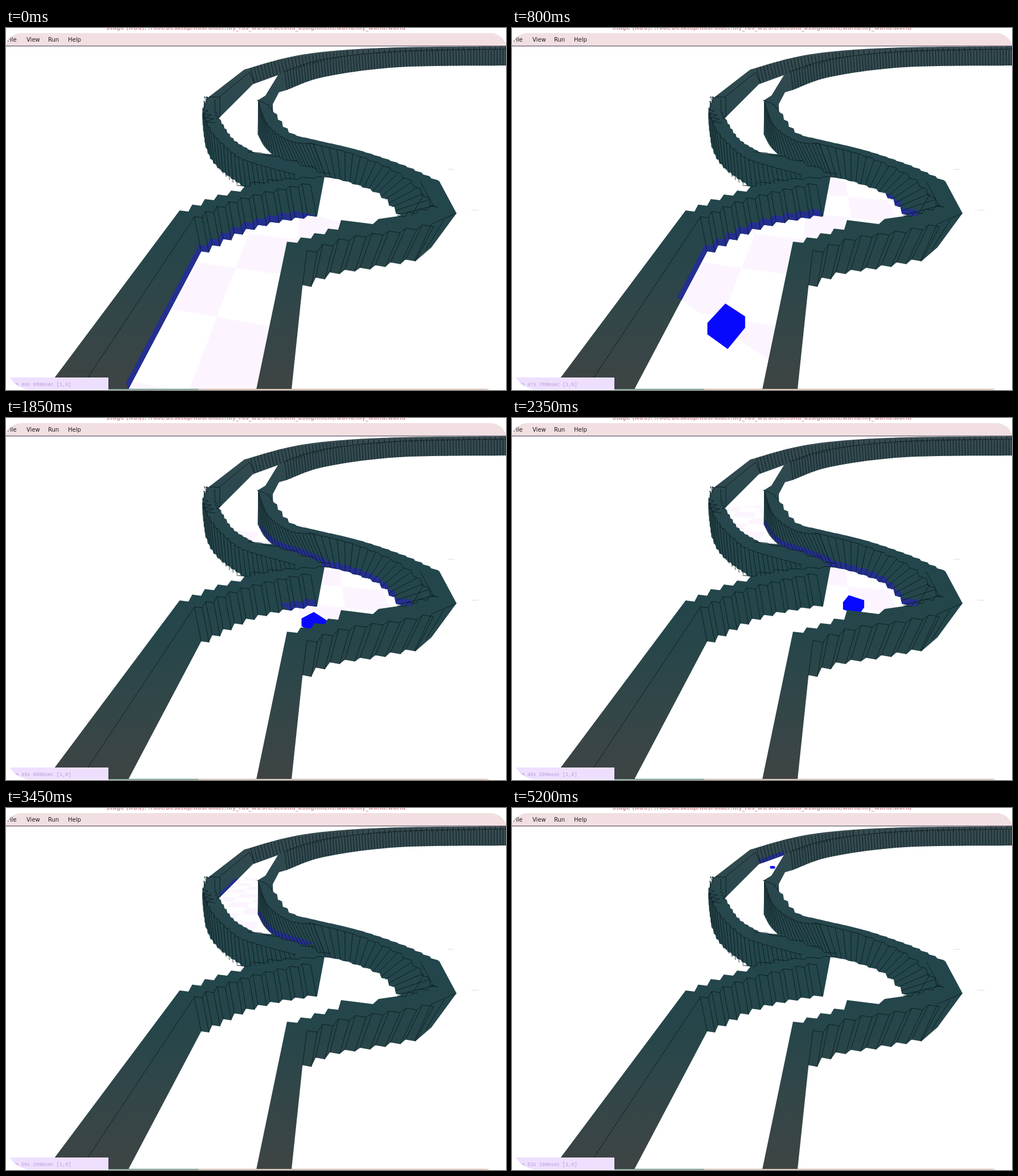
An HTML page with a canvas for the animation above (5.25 s loop, 879 by 637 pixels).

```html
<!DOCTYPE html>
<html lang="en">
<head>
<meta charset="utf-8">
<title>Track simulation</title>
<style>
html, body { margin: 0; width: 100%; height: 100%; overflow: hidden; background: #fff; }
canvas { display: block; }
</style>
</head>
<body>
<canvas id="stage" width="879" height="637"></canvas>
<script>
const ctx = document.getElementById('stage').getContext('2d');
const W = 879, H = 637, LOOP = 5250, STEP = 50;

// ---------- curves ----------
// smooth dense line through a few x, y pairs
function curve(...v) {
  const n = v.length / 2, out = [];
  const at = (i, c) => v[2 * Math.max(0, Math.min(n - 1, i)) + c];
  for (let i = 0; i < n - 1; i++)
    for (let u = 0; u < 1; u += .05)
      out.push([0, 1].map(c => {
        const [a, b, d, e] = [-1, 0, 1, 2].map(k => at(i + k, c));
        return b + u * (d - a + u * (2 * a - 5 * b + 4 * d - e + u * (3 * b - a - 3 * d + e))) / 2;
      }));
  return [...out, v.slice(-2)];
}

// n + 1 points evenly spaced along a line
function spread(line, n) {
  const len = [0];
  for (let i = 1; i < line.length; i++)
    len.push(len[i - 1] + Math.hypot(line[i][0] - line[i - 1][0], line[i][1] - line[i - 1][1]));
  const out = [];
  for (let k = 0, i = 1; k <= n; k++) {
    const d = len[len.length - 1] * k / n;
    while (i < line.length - 1 && len[i] < d) i++;
    const u = (d - len[i - 1]) / (len[i] - len[i - 1]);
    out.push([0, 1].map(c => line[i - 1][c] + (line[i][c] - line[i - 1][c]) * u));
  }
  return out;
}

// block edges: a short, slightly sloping run centred on each sample
function stairs(line, n, run = .75, tilt = 1) {
  const s = spread(line, n);
  return s.flatMap(([x, y], i) => {
    const a = s[Math.max(0, i - 1)], b = s[Math.min(n, i + 1)];
    const w = (b[0] - a[0]) / (i % n ? 2 : 1) * run / 2, h = tilt * Math.sign(w);
    return [[x - w, y - h], [x + w, y + h]];
  });
}

function add(path, line, close) {
  line.forEach(([x, y], i) => i ? path.lineTo(x, y) : path.moveTo(x, y));
  if (close) path.closePath();
}
function poly(line) {
  const p = new Path2D();
  add(p, line, true);
  return p;
}
const shift = (line, dx, dy) => line.map(([x, y]) => [x + dx, y + dy]);
const band = (line, dx, dy) => poly([...line, ...shift(line, dx, dy).reverse()]);

// ---------- track ----------
const leftRidge = curve(347,150, 361,182, 389,212, 421,233, 505,257);
const leftFoot = curve(351,210, 372,245, 416,278, 508,264);
const leftTop = curve(376,161, 400,196, 437,219);
const nearOuter = stairs(curve(313,322, 360,301, 404,287), 4, .7);
const nearRidge = stairs(curve(338,333, 401,306, 466,288, 528,275), 9, .7);
const nearBase = stairs(curve(350,394, 410,362, 464,344, 538,331), 9, .7);
const bendRidge = curve(540,204, 620,225, 700,262, 752,313);
const bendBase = curve(562,262, 598,270, 655,292, 690,328);
const curveRidge = curve(444,131, 461,172, 500,199, 540,204);
const curveBase = curve(443,188, 470,222, 520,240, 560,256);
const rightTop = [...stairs(curve(503,377, 545,364, 575,354), 3), [589,338], [645,345], [655,336], [690,331]];
const rightRidge = stairs(curve(538,393, 600,371, 682,359, 742,348), 7, .65, 1.5);
const rightBase = stairs(curve(529,454, 572,433, 647,421, 711,409), 7, .65, 1.5);
const rightCrest = curve(490,76, 560,55, 690,41, 879,37);
const rightFoot = curve(494,109, 560,86, 690,69, 879,66);
const bendOuter = curve(753,266, 700,242, 620,215, 540,196, 500,184, 473,150);
const leftCrest = curve(419,73, 520,47, 660,35, 879,32);

const lane1 = [[376,157], [434,99], [478,83], [456,119], [443,127],
  ...curve(443,188, 453,207, 467,222), ...stairs(leftTop, 9).reverse()];
const lane2 = [[215,636], ...nearBase, [547,331], [560,262], ...stairs(bendBase, 8), ...rightTop.slice().reverse(), [440,636]];
const floor = new Path2D();
add(floor, lane1, true);
add(floor, lane2, true);

const walls = new Path2D(floor);
add(walls, [...leftCrest.slice().reverse(), ...stairs(curve(354,121, 345,150, 352,210, 372,245, 416,278), 18),
  ...nearOuter.slice().reverse(), [70,636], [502,636], ...rightBase, [748,386], [792,326], [762,270],
  ...stairs(bendOuter, 20, .8, 1.5), [469,134], [480,113], ...rightFoot], true);

const lines = new Path2D();
[nearRidge, rightRidge, rightCrest, stairs(leftRidge, 16), stairs(bendRidge, 11, .8, 2), stairs(curveRidge, 14),
  [[130,636], [331,333]], [[357,121], [376,122], [376,157]], [[374,122], [428,78], [437,97]],
  stairs(curve(437,219, 497,232, 560,255), 4), stairs(curve(416,278, 470,268, 560,262), 5),
  stairs(curve(352,122, 350,142, 360,166), 6, 5), stairs(curve(367,126, 368,145, 373,160), 6, 3),
  stairs(curve(444,128, 460,135, 470,148), 4), stairs(curve(695,331, 725,322, 752,314), 3),
  [[713,330], [735,292]], [[752,314], [728,270]], [[792,326], [748,345], [718,410]], [[770,338], [738,390]]
].forEach(l => add(lines, l));

const link = (a, b) => a.forEach((p, i) => add(lines, [p, b[i]]));
const ribs = (a, b, n) => link(spread(a, n), spread(b, n));
link(nearRidge, nearBase);
link(rightRidge, rightBase);
ribs(leftRidge, leftFoot, 24);
ribs(curveRidge, curveBase, 20);
ribs(bendRidge, bendBase, 17);
ribs(rightCrest, rightFoot, 76);
ribs(curve(430,70, 490,54, 600,40), curve(437,97, 490,78, 600,48), 28);
ribs(curve(600,39, 879,32), curve(600,47, 879,37), 30);

const paint = ctx.createLinearGradient(0, 0, 0, H);
[[.05, '#384b50'], [.22, '#29484e'], [.42, '#22464c'], [.6, '#25464a'], [.8, '#334648'], [1, '#3e4444']]
  .forEach(([at, c]) => paint.addColorStop(at, c));

const strips = [
  band([[215,636], [343,394], ...nearBase], -4, -12),
  band(curveBase, 2, -9),
  band([...stairs(bendBase, 8), [712,331]], 0, -11),
  band([[376,157], [434,99], [478,83]], 1, -8)
];

// ---------- ground plane ----------
const depth = (u, v) => Math.max(.0003, .00301 - .00009 * u - .00046 * v);
const project = ([u, v]) => {
  const d = depth(u, v);
  return [(1.285 + .21 * u - .255 * v) / d, 30 + 1 / d];
};

// time, u, v, heading in degrees, sensor reach, clock in tenths
const route = [
  [0, -.35, 5.2, -67, 6.4, 468],
  [800, .12, 2.2, -67, 5.4, 477],
  [1400, .68, .61, -32, 4, 482],
  [2350, 2.06, -.99, -66, 10.5, 492],
  [3450, .63, -3.69, -127, 13, 502],
  [4200, -2.1, -8.04, -45, 30, 511],
  [4700, -3.3, -14.7, -40, 30, 516],
  [5200, -3.4, -21.4, -26, 30, 521]
];
function pose(t) {
  let i = 1;
  while (i < route.length - 1 && route[i][0] < t) i++;
  const a = route[i - 1], b = route[i], k = (t - a[0]) / (b[0] - a[0]);
  const [u, v, deg, reach, tenths] = a.slice(1).map((x, j) => x + (b[j + 1] - x) * k);
  return { u, v, reach, angle: deg * Math.PI / 180, tenths: Math.floor(tenths + .01) };
}
const around = (p, angle, r) => [p.u + r * Math.cos(angle), p.v + r * Math.sin(angle)];

function viewShape(p) {
  const arc = [];
  for (let i = -20; i <= 20; i++) arc.push(project(around(p, p.angle + i * Math.PI / 40, p.reach)));
  return poly([...arc, project([p.u, p.v])]);
}

function drawFloor(view) {
  ctx.save();
  ctx.clip(floor);
  ctx.clip(view);
  ctx.fillStyle = '#fcf5ff';
  for (let u = -9; u < 7; u++)
    for (let v = -34; v < 6; v++)
      if ((u + v) % 2 === 0)
        ctx.fill(poly([[u, v], [u + 1, v], [u + 1, v + 1], [u, v + 1]].map(project)));
  ctx.restore();
}

function drawRobot(p) {
  const lift = .04 / depth(p.u, p.v);
  const foot = [1, 3, 5, 7].map(k => project(around(p, p.angle + k * Math.PI / 4, .255)));
  const top = shift(foot, 0, -lift);
  ctx.fillStyle = '#0808ff';
  ctx.fill(poly(foot));
  ctx.fill(poly(top));
  foot.forEach((f, i) => ctx.fill(poly([f, foot[(i + 1) % 4], top[(i + 1) % 4], top[i]])));
}

function drawStrips(view) {
  ctx.save();
  ctx.clip(view);
  ctx.fillStyle = '#242f90';
  strips.forEach(s => ctx.fill(s));
  ctx.restore();
}

// ---------- window ----------
const SANS = '"DejaVu Sans", sans-serif';
const title = 'Stage (ROS): /root/Desktop/RosFolder/my_ros_ws/src/second_assignment/world/my_world.world';

function box(x, y, w, h, color) {
  ctx.fillStyle = color;
  ctx.fillRect(x, y, w, h);
}
function label(text, x, y, font, color) {
  ctx.font = font;
  ctx.fillStyle = color;
  ctx.fillText(text, x, y);
}

function drawBars(tenths) {
  box(0, 9, W, 22, '#f1dfe1');
  box(0, 31, W, 1.3, '#685d70');
  ['File', 'View', 'Run', 'Help'].forEach((s, i) =>
    label(s, [2, 36, 74, 109][i], 24, '10px ' + SANS, '#1d1a20'));
  box(0, 615, 180, 21, '#eedfff');
  label(`0m ${Math.floor(tenths / 10)}s ${tenths % 10}00msec [1,0]`, 11.5, 630,
    '8.6px "Liberation Mono", monospace', '#b79bd6');
  box(180, 635, 158, 1.3, '#4b7b6c');
  box(338, 635, 541, 1.3, '#c8a893');
}

function draw(t) {
  const p = pose(t), view = viewShape(p);
  box(0, 0, W, H, '#fff');
  ctx.font = 'bold 10px ' + SANS;
  const size = 5270 / ctx.measureText(title).width;
  label(title, 176, 3, `bold ${size}px ${SANS}`, '#d79a9f');

  ctx.save();
  ctx.beginPath();
  ctx.roundRect(-1, 9, W + 2, 628, [28, 28, 42, 48]);
  ctx.clip();
  drawFloor(view);
  drawRobot(p);
  box(776, 248, 12, 1, '#dedee2');
  box(818, 320, 13, 1, '#dedee2');
  ctx.fillStyle = paint;
  ctx.fill(walls, 'evenodd');
  drawStrips(view);
  ctx.lineJoin = 'round';
  ctx.strokeStyle = '#0c1b1e';
  ctx.lineWidth = .9;
  ctx.stroke(lines);
  drawBars(p.tenths);
  ctx.restore();
}

const start = performance.now();
function tick() {
  const t = (performance.now() - start) % LOOP;
  draw(Math.floor(t / STEP) * STEP);
  requestAnimationFrame(tick);
}
tick();
</script>
</body>
</html>
```
